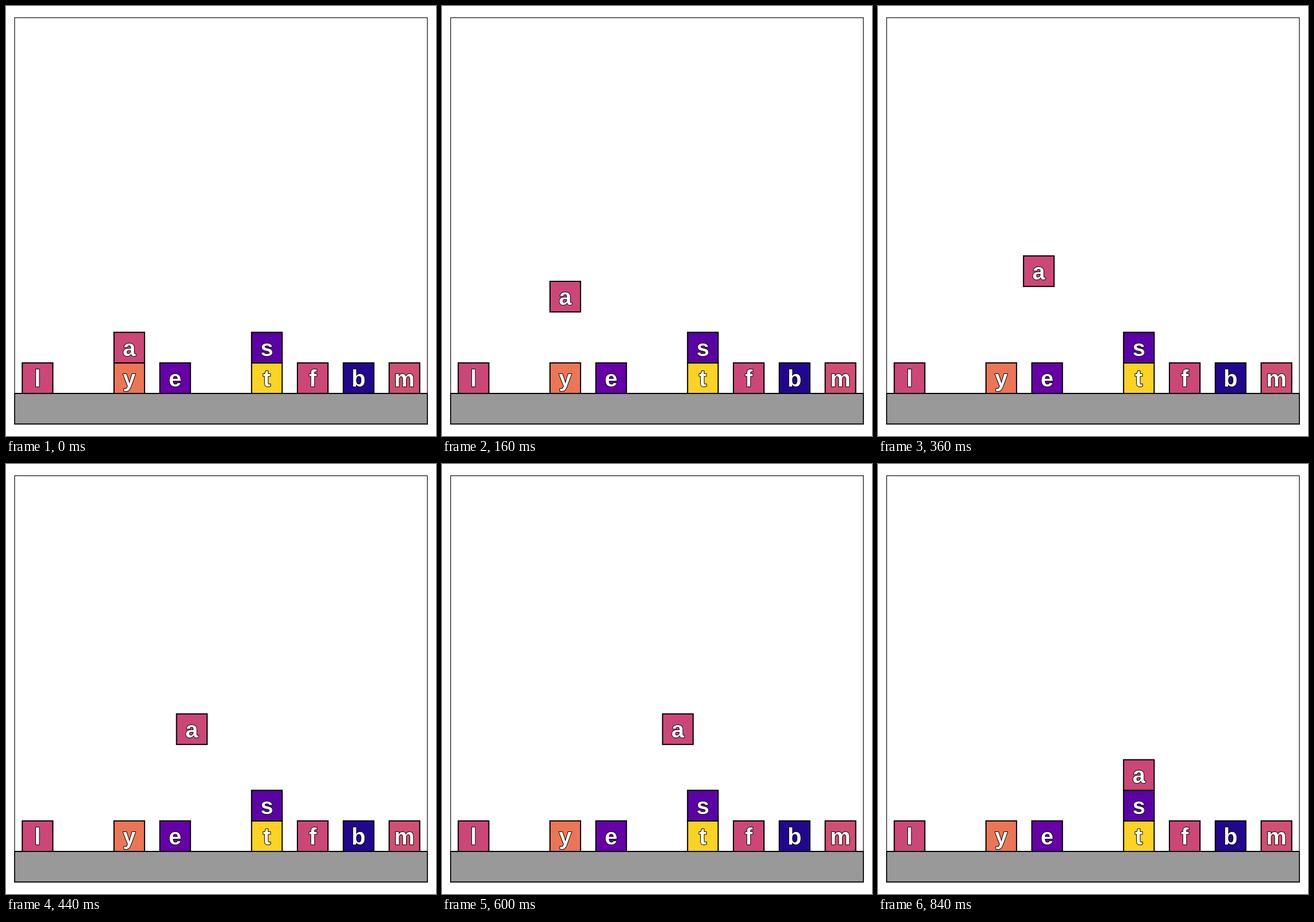
These frames come from a looping animation (748 px wide and 748 px high, 880 ms). An HTML page:

```html
<!DOCTYPE html>
<html lang="en">
<head>
<meta charset="utf-8">
<title>Blocks</title>
<style>
  html, body { margin: 0; width: 100%; height: 100%; overflow: hidden; background: #fff; }
  svg { display: block; width: 100vw; height: 100vh; }
  rect { stroke: #000; stroke-width: 2; }
  .frame { fill: none; stroke: #222; stroke-width: 1.35; }
  text {
    font: bold 40px "Liberation Sans", Arial, sans-serif;
    text-anchor: middle;
    fill: #fff;
    stroke: #000;
    stroke-width: 2;
    stroke-linejoin: round;
    paint-order: stroke;
  }
</style>
</head>
<body>
<svg id="stage" viewBox="0 0 748 748"></svg>
<script>
const NS = 'http://www.w3.org/2000/svg';
const stage = document.getElementById('stage');
const LEFT = 15, TOP = 20.4, RIGHT = 733, FLOOR = 674;
const CELL = (RIGHT - LEFT) / 9, SIZE = CELL * 2 / 3;
const STEP = 40, LOOP = 880;

// letter, colour, column, level
const blocks = [
  ['l', '#cc4778', 0, 0],
  ['y', '#eb7655', 2, 0],
  ['e', '#6600a7', 3, 0],
  ['t', '#fcd225', 5, 0],
  ['s', '#5b01a5', 5, 1],
  ['f', '#cc4778', 6, 0],
  ['b', '#220690', 7, 0],
  ['m', '#d14e72', 8, 0],
  ['a', '#cc4778', 2, 1]
];

function add(parent, tag, attrs) {
  const node = document.createElementNS(NS, tag);
  for (const key in attrs) node.setAttribute(key, attrs[key]);
  return parent.appendChild(node);
}

const columnX = col => LEFT + CELL * col + SIZE / 4;
const levelY = level => FLOOR - SIZE * (level + 1);

function place(node, x, y) {
  node.setAttribute('transform', `translate(${x.toFixed(2)} ${y.toFixed(2)})`);
}

function addBlock([letter, fill, col, level]) {
  const g = add(stage, 'g', {});
  add(g, 'rect', { width: SIZE, height: SIZE, fill });
  add(g, 'text', { x: SIZE / 2, y: 41 }).textContent = letter;
  place(g, columnX(col), levelY(level));
  return g;
}

add(stage, 'rect', { x: LEFT, y: FLOOR, width: RIGHT - LEFT, height: SIZE, fill: '#999' });
add(stage, 'rect', { class: 'frame', x: LEFT, y: TOP, width: RIGHT - LEFT, height: FLOOR + SIZE - TOP });
const mover = blocks.map(addBlock).pop();

// step, column, level: lift, carry, lower
const path = [[0, 2, 1], [6, 2, 3.5], [17, 5, 3.5], [21, 5, 2]];

function draw(now) {
  const step = Math.floor((now % LOOP) / STEP);
  const i = Math.max(1, path.findIndex(p => p[0] >= step));
  const [s0, c0, l0] = path[i - 1], [s1, c1, l1] = path[i];
  const k = (step - s0) / (s1 - s0);
  place(mover, columnX(c0 + (c1 - c0) * k), levelY(l0 + (l1 - l0) * k));
}

const start = performance.now();
function tick() {
  draw(performance.now() - start);
  requestAnimationFrame(tick);
}
tick();
</script>
</body>
</html>
```
